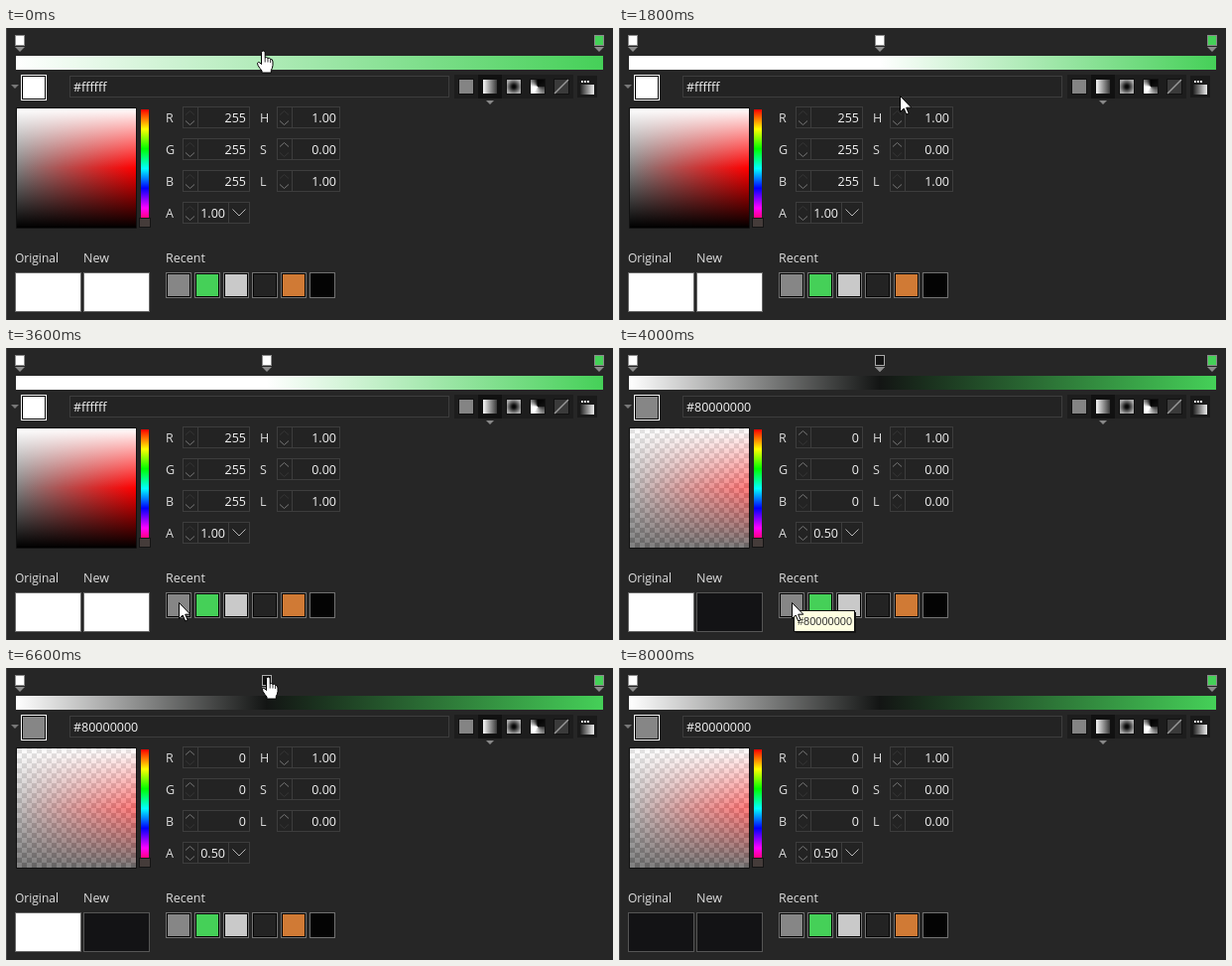
An HTML page that plays this animation: 612x294 px, repeating every 8.8 s.

```html
<!DOCTYPE html>
<html lang="en">
<head>
<meta charset="utf-8">
<title>Gradient editor</title>
<style>
html, body { margin: 0; width: 100%; height: 100%; overflow: hidden; background: #262626; }
#stage { position: absolute; left: 0; top: 0; width: 612px; height: 294px; overflow: hidden; background: #262626; }
svg { position: absolute; left: 0; top: 0; }
#stage div { position: absolute; }
text { font: 12.5px "Open Sans", "Noto Sans", sans-serif; fill: #dedede; }
.value { fill: #f4f4f4; }
.end { text-anchor: end; }
.tip { font: 11px "Liberation Sans", Arial, sans-serif; fill: #333; }
.field { fill: #232323; stroke: #3d3d3d; }
.line { stroke: #3d3d3d; fill: none; }
.chev { fill: none; stroke: #777; }
.drop { stroke: #b5b5b5; }
.dim { stroke: #363636; }

.bar { left: 10px; top: 28px; width: 592px; height: 14px; }
.two { background: linear-gradient(90deg, #fff, #45d058); }
.three { background: linear-gradient(90deg, #fff 42.7%, #45d058); }
.dark { background: linear-gradient(90deg, #fff, #131514 42.7%, #45d058); }
.pick { left: 11px; top: 81px; width: 120px; height: 120px;
  background: linear-gradient(#fff, #fff0 50%, #0000 50%, #000), linear-gradient(90deg, #808080, #f00); }
.check { left: 11px; top: 81px; width: 120px; height: 120px;
  background: conic-gradient(#fff 25%, #ccc 0 50%, #fff 0 75%, #ccc 0) 0 0 / 10px 10px; }
.check .pick { left: 0; top: 0; opacity: .5; }
.hue { left: 136px; top: 82px; width: 8px; height: 119px;
  background: linear-gradient(#f00, #ff0, #0f0, #0ff, #00f, #f0f, #f00); }
.cone { left: 529px; top: 52px; width: 14px; height: 14px;
  background: conic-gradient(from 90deg, #333, #fff 35%, #fff 50%, #000 75%, #111); }

/* one tick = 200 ms = 1/44 of the loop */
.add, .before, .after, .saved, .mid, .tool, .hand, .arrow, #cursor { animation: 8.8s step-end infinite; }
.add { animation-name: add; }
.before { animation-name: before; }
.after { animation-name: after; }
.saved { animation-name: saved; }
.mid { animation-name: mid; }
.tool { animation-name: tool; }
.hand { animation-name: hand; }
.arrow { animation-name: arrow; }
#cursor { animation-name: move; }
@keyframes add { 0% { opacity: 0 } 4.54%, 100% { opacity: 1 } }
@keyframes before { 0% { opacity: 1 } 45.45%, 100% { opacity: 0 } }
@keyframes after { 0% { opacity: 0 } 45.45%, 100% { opacity: 1 } }
@keyframes saved { 0% { opacity: 0 } 77.27%, 100% { opacity: 1 } }
@keyframes mid { 0% { opacity: 0 } 4.54% { opacity: 1 } 84.09%, 100% { opacity: 0 } }
@keyframes tool { 0% { opacity: 0 } 45.45% { opacity: 1 } 59.09%, 100% { opacity: 0 } }
@keyframes hand { 0% { opacity: 1 } 20.45% { opacity: 0 } 59.09%, 100% { opacity: 1 } }
@keyframes arrow { 0% { opacity: 0 } 20.45% { opacity: 1 } 59.09%, 100% { opacity: 0 } }
@keyframes move {
  0% { transform: translate(260px, 24px) }
  2.27% { transform: translate(261px, 25px) }
  4.54% { transform: translate(262px, 22px) }
  6.81% { transform: translate(262px, 18px) }
  18.18% { transform: translate(268px, 32px) }
  20.45% { transform: translate(283px, 68px) }
  22.72% { transform: translate(262px, 110px) }
  25% { transform: translate(230px, 148px) }
  27.27% { transform: translate(194px, 183px) }
  29.54% { transform: translate(180px, 220px) }
  31.81% { transform: translate(187px, 236px) }
  34.09% { transform: translate(180px, 250px) }
  36.36% { transform: translate(174px, 256px) }
  59.09% { transform: translate(190px, 232px) }
  61.36% { transform: translate(207px, 180px) }
  63.63% { transform: translate(224px, 128px) }
  65.9% { transform: translate(240px, 84px) }
  68.18% { transform: translate(254px, 46px) }
  70.45% { transform: translate(264px, 19px) }
  72.72% { transform: translate(265px, 13px) }
  75% { transform: translate(265px, 10px) }
  81.81% { transform: translate(268px, 8px) }
  84.09% { transform: translate(276px, 0px) }
  86.36% { transform: translate(284px, -14px) }
  90.9%, 100% { transform: translate(284px, -60px) }
}
</style>
</head>
<body>
<div id="stage">
  <svg id="ui" width="612" height="294">
    <defs>
      <linearGradient id="lin"><stop stop-color="#fff"/><stop offset="1" stop-color="#333"/></linearGradient>
      <linearGradient id="rise"><stop stop-color="#222"/><stop offset="1" stop-color="#eee"/></linearGradient>
      <radialGradient id="rad"><stop stop-color="#000"/><stop offset=".25" stop-color="#111"/><stop offset="1" stop-color="#aaa"/></radialGradient>
    </defs>
    <path d="M.5 0v294" stroke="#484848"/>
    <path d="M5 57h8l-4 4z" fill="#777"/>
    <rect class="field" x="64.5" y="48.5" width="382" height="21"/>
    <rect x="452" y="47" width="120" height="24" fill="#1d1d1d"/>
    <rect x="476" y="47" width="24" height="24" fill="#111"/>
    <rect x="576" y="48" width="20" height="22" fill="#1a1a1a"/>
    <g stroke="#111">
      <rect x="456.5" y="51.5" width="15" height="15" fill="#848484"/>
      <rect x="480.5" y="51.5" width="15" height="15" fill="url(#lin)"/>
      <rect x="504.5" y="51.5" width="15" height="15" fill="url(#rad)"/>
      <rect x="528.5" y="51.5" width="15" height="15" fill="#111"/>
      <rect x="552.5" y="51.5" width="15" height="15" fill="#3a3a3a"/>
      <path d="M553 66L567 52" stroke="#999" stroke-width="1.5"/>
    </g>
    <rect x="579" y="57" width="14" height="10" fill="url(#rise)"/>
    <path d="M580 54h2m1 0h2m1 0h2" stroke="#fff" stroke-width="2"/>
    <path d="M484 73h8l-4 4z" fill="#888"/>
    <path d="M10.5 80.5h121v121h-121z" fill="none" stroke="#111"/>
    <text x="9" y="236" style="font-size:12px">Original</text>
    <text x="78" y="236">New</text>
    <text x="161" y="236">Recent</text>
  </svg>
  <div class="bar two"></div>
  <div class="bar three add"></div>
  <div class="bar dark after"></div>
  <div class="pick before"></div>
  <div class="check after"><div class="pick"></div></div>
  <div class="hue"></div>
  <div class="cone"></div>
  <svg id="top" width="612" height="294">
    <rect x="134.5" y="191.5" width="11" height="9" fill="#453c3a" stroke="#151515"/>
    <g id="marks"></g>
    <g class="tool">
      <rect x="178" y="266" width="61" height="21" fill="#151515"/>
      <rect x="176.5" y="264.5" width="61" height="21" fill="#ffffe1" stroke="#111"/>
      <text class="tip" x="180" y="279">#80000000</text>
    </g>
    <g id="cursor" stroke="#000" fill="#fff">
      <g class="hand">
        <path d="M-2.5.8Q-2.5-1-.7-1T1.2.8V6Q2.8 4.8 4 6.4 5.8 5.4 6.6 7.4 9 7 9 10V13.5Q8.7 16.5 7.3 18.5V21H-2V19Q-4 17-6 13.5-7.3 10.6-5.4 10.4-4 10.5-2.5 12.5Z"/>
        <path d="M1.2 6v4.5M4 6.5v4M6.6 7.5v3.5" stroke-width=".8"/>
      </g>
      <path class="arrow" d="M.5.5V16.5L4.2 13 6.8 19 9.2 18 6.7 12.2H11.8Z"/>
    </g>
  </svg>
</div>
<script>
const ui = document.getElementById('ui');
const marks = document.getElementById('marks');
const add = (parent, html) => parent.insertAdjacentHTML('beforeend', html);
const rect = (x, y, w, h, fill, stroke, cls = '') =>
  `<rect class="${cls}" x="${x + .5}" y="${y + .5}" width="${w}" height="${h}" fill="${fill}" stroke="${stroke}"/>`;

// value field whose contents switch when the new colour is picked
function field(name, x, row, w, states, max) {
  const y = 79 + row * 32, drop = name === 'A';
  const right = x + w - (drop ? 25 : 4);
  let html = `<text x="${x - 17}" y="${y + 16}">${name}</text>` +
    `<rect class="field" x="${x + .5}" y="${y + .5}" width="${w - 1}" height="21"/>` +
    `<path class="line" d="M${x + 15.5} ${y}v22"/>`;
  if (drop) html += `<path class="line" d="M${x + 46.5} ${y}v22"/>` +
    `<path class="chev drop" d="M${x + 50.5} ${y + 7.5}l6.5 6.5 6.5-6.5"/>`;
  states.forEach((value, i) => {
    const up = +value === max ? 'dim' : '', down = +value === 0 ? 'dim' : '';
    html += `<g class="${i ? 'after' : 'before'}">
      <path class="chev ${up}" d="M${x + 3} ${y + 8.5}l4.5-4 4.5 4"/>
      <path class="chev ${down}" d="M${x + 3} ${y + 14.5}l4.5 4 4.5-4"/>
      <text class="value end" x="${right}" y="${y + 16}">${value}</text></g>`;
  });
  add(ui, html);
}

[...'RGB'].forEach((c, i) => field(c, 178, i, 68, ['255', '0'], 255));
field('A', 178, 3, 68, ['1.00', '0.50'], 1);
field('H', 273, 0, 64, ['1.00', '1.00'], 1);
field('S', 273, 1, 64, ['0.00', '0.00'], 1);
field('L', 273, 2, 64, ['1.00', '0.00'], 1);

add(ui, '<text class="value before" x="68" y="64">#ffffff</text>' +
  '<text class="value after" x="68" y="64">#80000000</text>');

add(ui, rect(15, 47, 25, 25, '#000', '#fff') +
  rect(17, 49, 21, 21, '#fff', '#fff', 'before') +
  rect(17, 49, 21, 21, '#868686', '#868686', 'after'));

const ink = '#131315';
add(ui, rect(9, 246, 66, 39, '#fff', '#666') + rect(9, 246, 66, 39, ink, '#555', 'saved') +
  rect(78, 246, 66, 39, '#fff', '#666') + rect(78, 246, 66, 39, ink, '#555', 'after'));

['#868686', '#45d058', '#c9c9c9', '#232323', '#d07a35', '#040404'].forEach((c, i) => {
  const x = 161 + i * 29;
  add(ui, rect(x, 246, 25, 25, '#000', '#737373') + rect(x + 2, 248, 21, 21, c, c));
});

const mark = (x, fill, edge) => rect(x - 5, 7, 9, 10, fill, edge) +
  `<path d="M${x - 5} 19h10l-5 5z" fill="#8a8a8a"/>`;
add(marks, mark(14, '#fff', '#8a8a8a') + mark(598, '#45d058', '#8a8a8a') +
  `<g class="mid">${mark(263, '#fff', '#8a8a8a')}<g class="after">${mark(263, '#131313', '#aaa')}</g></g>`);
</script>
</body>
</html>
```
